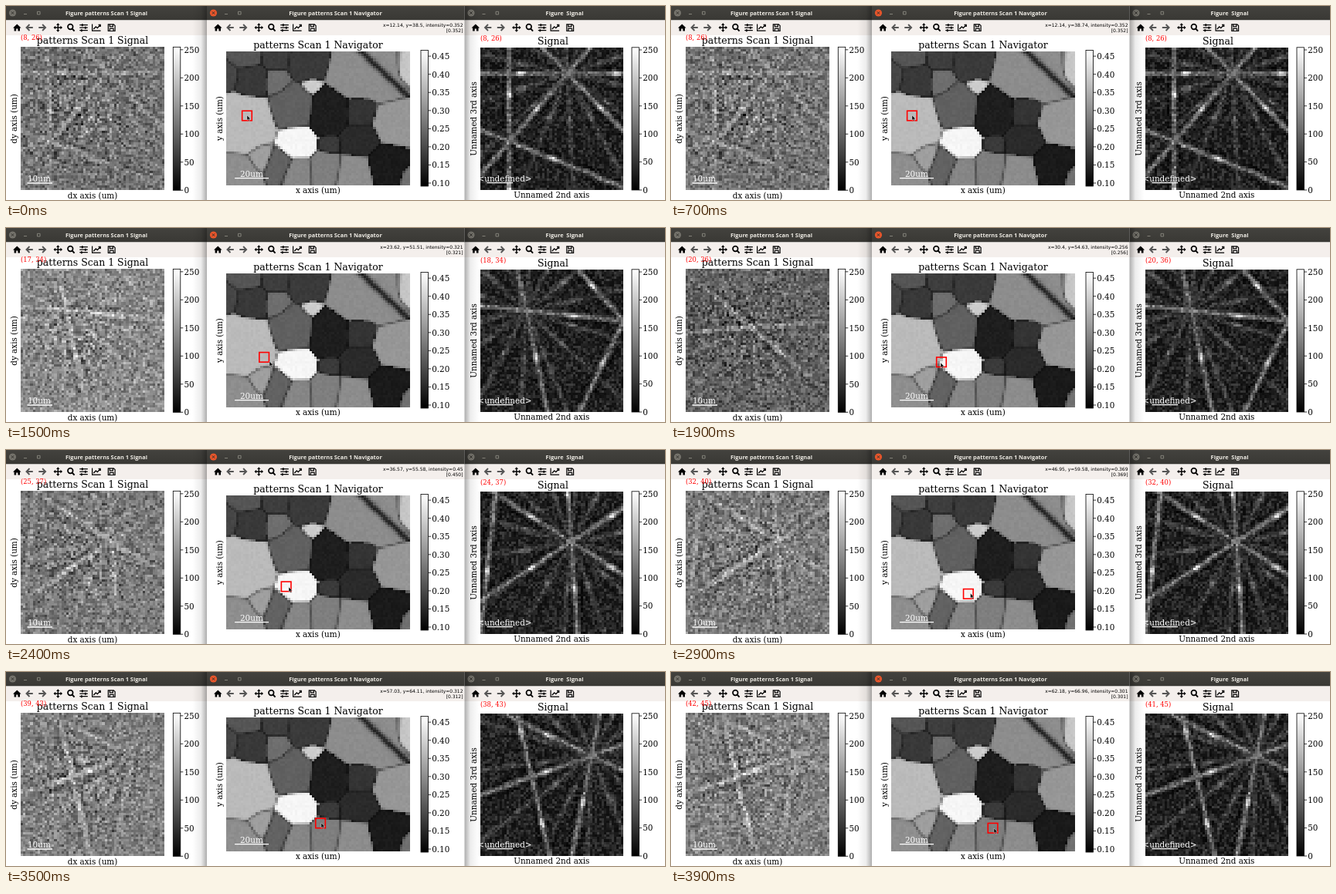
Recreate the animation shown at these times as an HTML page with a canvas. Size 853 by 252 pixels, loop 4000 ms.

```html
<!DOCTYPE html>
<html lang="en">
<head>
<meta charset="utf-8">
<title>Pattern navigator</title>
<style>
html, body { margin: 0; width: 100%; height: 100%; overflow: hidden; background: #fff; }
canvas, svg { position: absolute; }
canvas { image-rendering: pixelated; }
#raw { left: 19px; top: 53px; width: 186px; height: 186px; }
#nav { left: 285px; top: 58.5px; width: 237.5px; height: 174.5px; }
#sim { left: 614px; top: 54px; width: 185px; height: 185px; }
svg { left: 0; top: 0; }
text { font: 10.4px "DejaVu Serif", serif; white-space: pre; }
.mid { text-anchor: middle; }
.title { font-size: 12.5px; }
.win { font: bold 7.4px "Open Sans", sans-serif; fill: #eeebe4; }
.status { font: 6px "DejaVu Sans", sans-serif; text-anchor: end; }
.index { font-size: 8.4px; fill: #f00; }
.scale { fill: #fff; }
</style>
</head>
<body>
<canvas id="raw" width="60" height="60"></canvas>
<canvas id="nav" width="75" height="55"></canvas>
<canvas id="sim" width="60" height="60"></canvas>
<svg width="853" height="252" viewBox="0 0 853 252">
  <defs>
    <linearGradient id="gray" x1="0" y1="0" x2="0" y2="1">
      <stop stop-color="#fff"/><stop offset="1"/>
    </linearGradient>
    <linearGradient id="bar" x1="0" y1="0" x2="0" y2="1">
      <stop stop-color="#43423e"/><stop offset="1" stop-color="#393834"/>
    </linearGradient>
    <linearGradient id="shade">
      <stop stop-opacity="0"/><stop offset=".6" stop-opacity=".07"/><stop offset="1" stop-opacity=".32"/>
    </linearGradient>
    <g id="tools" fill="none" stroke="#000">
      <path d="M8.7 28.4l5.3-5 5.3 5h-1.6v4.2h-2.6v-3h-2.2v3h-2.6v-4.2z" fill="#000" stroke="none"/>
      <path d="M34.5 28h-8M30.2 24l-4 4 4 4M42 28h8M46.8 24l4 4-4 4" stroke="#555" stroke-width="1.9"/>
      <path d="M67 23.5v9M62.5 28h9" stroke-width="1.4"/>
      <path d="M64.7 24.8l2.3-2.6 2.3 2.6zM64.7 31.2l2.3 2.6 2.3-2.6zM63.8 25.7l-2.6 2.3 2.6 2.3zM70.2 25.7l2.6 2.3-2.6 2.3z" fill="#000" stroke="none"/>
      <circle cx="83" cy="27" r="3.3" stroke-width="1.7"/>
      <path d="M85.3 29.4l3 3.2" stroke-width="2"/>
      <path d="M95 24.7h10.5M95 28.2h10.5M95 31.7h10.5" stroke-width="1.2"/>
      <path d="M98.5 23.2v3M102.5 26.7v3M97.5 30.2v3" stroke-width="1.8"/>
      <path d="M111.3 23.5v8.7h11" stroke-width="1.2"/>
      <path d="M113 30l3-3 2 1.7 3.5-4M119.3 24.3h2.6v2.6" stroke-width="1.3"/>
      <path d="M132 23.8h7l1.8 1.8v6.9H132zM134 24v2.8h4V24M134 32.3v-3h4.8v3" stroke-width="1.2"/>
    </g>
  </defs>
  <g id="windows"></g>
  <rect x="241" width="19" height="252" fill="url(#shade)"/>
  <rect width="19" height="252" fill="url(#shade)" transform="translate(612.5 0) scale(-1 1)"/>

  <text class="mid title" x="112" y="49.4">patterns Scan 1 Signal</text>
  <text class="mid title" x="404" y="54.6">patterns Scan 1 Navigator</text>
  <text class="mid title" x="708" y="50">Signal</text>
  <text class="mid" x="112" y="249.5">dx axis (um)</text>
  <text class="mid" x="403.8" y="243.2">x axis (um)</text>
  <text class="mid" x="706.3" y="248.6">Unnamed 2nd axis</text>
  <text class="mid" transform="translate(14 146.5) rotate(-90)">dy axis (um)</text>
  <text class="mid" transform="translate(280 146) rotate(-90)">y axis (um)</text>
  <text class="mid" transform="translate(608.5 146.5) rotate(-90)">Unnamed 3rd axis</text>
  <g id="bars"></g>

  <path d="M27.5 230H60M296 223.6H340M622.5 229.6H656" stroke="#fff" stroke-width="1.3"/>
  <text class="scale" x="28" y="228">10um</text>
  <text class="scale" x="303" y="222.4">20um</text>
  <text class="scale" x="610.5" y="227.6">&lt;undefined&gt;</text>

  <text class="index" id="rawIndex" x="19" y="44.4"></text>
  <text class="index" id="simIndex" x="614" y="45.4"></text>
  <text class="status" id="where" x="591.5" y="27"></text>
  <text class="status" id="value" x="591.5" y="34"></text>
  <rect id="box" x="-6.3" y="-6.3" width="12.6" height="12.6" fill="none" stroke="#f00" stroke-width="1.6"/>
  <path id="cursor" d="M0 0v6.4l1.5-1.3 1.1 2.5 1.1-.5-1.1-2.4h2z" stroke="#fff" stroke-width=".4"/>
</svg>
<script>
const $ = id => document.getElementById(id);
const falloff = (d, w) => Math.exp(-d * d / (w * w));

function random(seed) {
  let s = seed * 2654435761 >>> 0;
  return () => {
    s = s + 0x6D2B79F5 >>> 0;
    let h = Math.imul(s ^ s >>> 15, s | 1);
    h ^= h + Math.imul(h ^ h >>> 7, h | 61);
    return ((h ^ h >>> 14) >>> 0) / 4294967296;
  };
}

// Fills a canvas with grey levels from 0 to 1
function plot(id, level) {
  const { width, height } = $(id), c = $(id).getContext('2d');
  const img = c.createImageData(width, height);
  for (let y = 0, p = 0; y < height; y++) for (let x = 0; x < width; x++, p += 4) {
    img.data.fill(255 * level(x, y), p, p + 3);
    img.data[p + 3] = 255;
  }
  c.putImageData(img, 0, 0);
}

// Window frames
function frame(x, width, mid, title, active) {
  const close = x + 8.5;
  return `<rect x="${x}" width="${width}" height="18.5" fill="url(#bar)"/>
    <rect x="${x}" y="18.5" width="${width}" height="19.5" fill="#f4efec"/>
    <circle cx="${close}" cy="9" r="4.6" fill="${active ? '#e9562b' : '#75736c'}"/>
    <path d="M${close - 1.7} 7.3l3.4 3.4m0-3.4l-3.4 3.4" stroke="#33322e"/>
    <path d="M${x + 23} 10.5h4M${x + 40.5} 7.3h3.6v3.6h-3.6z" fill="none" stroke="#95938a" stroke-width=".8"/>
    <text class="win mid" x="${mid}" y="11.8">${title}</text>
    <use href="#tools" x="${x + .3}"/>`;
}
$('windows').innerHTML =
  frame(0, 260, 130, 'Figure patterns Scan 1 Signal') +
  frame(260, 333.5, 426.5, 'Figure patterns Scan 1 Navigator', true) +
  frame(593.5, 260, 723, 'Figure  Signal');

// Colour bars with evenly spaced ticks
function bar(x, top, bottom, first, gap, count, label) {
  let out = `<rect x="${x}" y="${top}" width="9.5" height="${bottom - top}" fill="url(#gray)"
    stroke="#000" stroke-width=".8"/>`;
  for (let i = 0; i < count; i++) {
    const y = first - i * gap;
    out += `<path d="M${x + 9.5} ${y}h3.5" stroke="#000" stroke-width=".8"/>
      <text x="${x + 14.2}" y="${y + 3.8}">${label(i)}</text>`;
  }
  return out;
}
$('bars').innerHTML =
  bar(216.3, 53.3, 239.3, 239.3, 36.5, 6, i => i * 50) +
  bar(537, 57.5, 234, 230, 23.55, 8, i => (.1 + i * .05).toFixed(2)) +
  bar(810, 53.8, 239, 239, 36.4, 6, i => i * 50);

// Grains grow as circles until they meet: x, y, radius, grey
const cell = 3.17;
const grains = [
  [308, 153, 38, 186], [318, 97, 20, 56], [288, 92, 12, 70], [312, 64, 16, 85],
  [350, 66, 16, 62], [350, 98, 14, 110], [391, 72, 24, 58], [395, 103, 9, 205],
  [372, 132, 28, 96], [420, 138, 30, 30], [377, 176, 22, 246], [420, 178, 12, 58],
  [455, 172, 24, 42], [455, 138, 22, 52], [455, 88, 36, 140], [490, 100, 24, 140],
  [518, 88, 10, 198], [502, 150, 26, 150], [450, 218, 26, 140], [492, 208, 24, 26],
  [522, 222, 10, 112], [415, 212, 22, 126], [378, 215, 18, 134], [352, 205, 18, 98],
  [300, 218, 26, 142], [330, 196, 16, 158]
];
const grit = random(5);
plot('nav', (col, row) => {
  const x = 285 + (col + .5) * cell, y = 58.5 + (row + .5) * cell;
  const [a, b] = grains
    .map(([gx, gy, r, grey]) => ({ d: Math.hypot(x - gx, y - gy) - r, grey }))
    .sort((p, q) => p.d - q.d);
  const seam = a.grey === b.grey ? 0 : falloff(b.d - a.d, 2.6);
  const twin = a.grey === 140 ? falloff(x - y * 1.05 - 398, 6) : 0;
  return (a.grey * (1 - .4 * seam) * (1 - .75 * twin) + grit() * 8 - 4) / 255;
});

// Bands radiate from zone axes, given as x, y and strong angles on 60 x 60 cells
const patterns = {
  square: { mean: .45, zones: [[36.1, 10.4, 0, 46, 130.5], [11.6, 39, 90, 22]] },
  tilted: { mean: .54, zones: [[18.7, 16.8, 5.8, 78], [59.7, 21, 116, 48]] },
  mixed: { mean: .38, zones: [[27, 24, 176, 40]] },
  star: { mean: .48, zones: [[37.7, 20.6, 32.5, 147, 86], [4.5, 13, 96]] },
  cross: { mean: .5, zones: [[26.5, 20.3, 45, 135], [5.5, 20.6, 97], [49, 20.6, 83], [26.5, 47.3, 3.5]] },
  fan: { mean: .5, zones: [[46.2, 17.2, 160.3, 101, 25.6], [21, 26.2, 77]] }
};
for (const p of Object.values(patterns)) {
  p.bands = p.zones.flatMap(([x, y, ...strong], n) => {
    const faint = n ? [] : Array.from({ length: 7 }, (_, k) => strong[0] + 12 + k * 25);
    return [...strong, ...faint].map((deg, i) => {
      const a = deg * Math.PI / 180;
      return { x, y, sin: Math.sin(a), cos: Math.cos(a), weight: i < strong.length ? 1 : .35 };
    });
  });
}

function paint(id, name, seed, noisy) {
  const { bands, mean } = patterns[name], r = random(seed);
  plot(id, (x, y) => {
    let peak = 0, trough = 0, spot = 0;
    for (const b of bands) {
      const dx = x - b.x, dy = y - b.y, d = dx * b.sin - dy * b.cos;
      const on = b.weight * falloff(d, 1);
      peak = Math.max(peak, on);
      trough = Math.max(trough, b.weight * falloff(Math.abs(d) - 2.3, 1));
      // each band brightens at a fixed distance from its axis
      spot = Math.max(spot, on * falloff(Math.abs(dx * b.cos + dy * b.sin) - 20, 1.8));
    }
    if (!noisy) return .06 + .2 * r() ** 1.6 + peak * (.2 + .28 * r()) - trough * .05 + spot * .5;
    const centre = falloff(Math.hypot(x - 25, y - 26), 22);
    const noise = (r() + r() + r() - 1.5) * (.16 + .1 * centre);
    return mean + noise + (.06 + .26 * centre) * (peak * .8 - trough * .45 + spot * .4);
  });
}

// step, cursor x, y, position x, y, intensity, column of the second signal
const path = [
  [6, 312, 142, 12.14, 38.5, .352, 8],
  [7, 312, 142, 12.14, 38.74, .352, 8],
  [12, 335, 172, 18.54, 49.17, .37, 16],
  [19, 349, 175, 30.4, 54.63, .256, 20],
  [24, 366, 178, 36.57, 55.58, .45, 24],
  [32, 400.5, 191, 53.17, 61.98, .321, 36],
  [39, 418, 203, 62.18, 66.96, .301, 41]
];
const rawTimes = { square: 0, tilted: 11, mixed: 18, star: 21, cross: 30, fan: 34 };
const simTimes = { square: 0, tilted: 14, star: 21, cross: 31, fan: 34 };
const current = (times, step) => Object.keys(times).filter(k => times[k] <= step).pop();

function pose(step) {
  const n = Math.max(1, path.findIndex(p => p[0] >= step));
  const a = path[n - 1], b = path[n];
  const k = Math.max(0, (step - a[0]) / (b[0] - a[0]));
  return a.map((v, i) => v + (b[i] - v) * k);
}

const move = (id, x, y) => $(id).setAttribute('transform', `translate(${x} ${y})`);

let shown, rawKey, simKey;
function draw() {
  let step = Math.floor(performance.now() % 4000 / 100);
  if (step === 16) step = 15; // the pointer rests for one step
  if (step !== shown) {
    shown = step;
    const [, cx, cy, x, y, level, simCol] = pose(step);
    const col = Math.floor((cx - 284.3) / cell), row = Math.round(y / 1.5);
    move('cursor', cx, cy);
    move('box', 285 + (Math.floor(x / 1.5) + .5) * cell, 58.5 + (row + .5) * cell);
    $('where').textContent = `x=${+x.toFixed(2)}, y=${+y.toFixed(2)}, intensity=${+level.toFixed(3)}`;
    $('value').textContent = `[${level.toFixed(3)}]`;
    $('rawIndex').textContent = `(${col}, ${row})`;
    $('simIndex').textContent = `(${Math.round(simCol)}, ${row})`;
    const raw = current(rawTimes, step), sim = current(simTimes, step);
    const key = raw + col + ',' + row;
    if (key !== rawKey) paint('raw', raw, col * 97 + row, true);
    if (sim !== simKey) paint('sim', sim, simTimes[sim] + 40, false);
    rawKey = key;
    simKey = sim;
  }
  requestAnimationFrame(draw);
}
draw();
</script>
</body>
</html>
```
